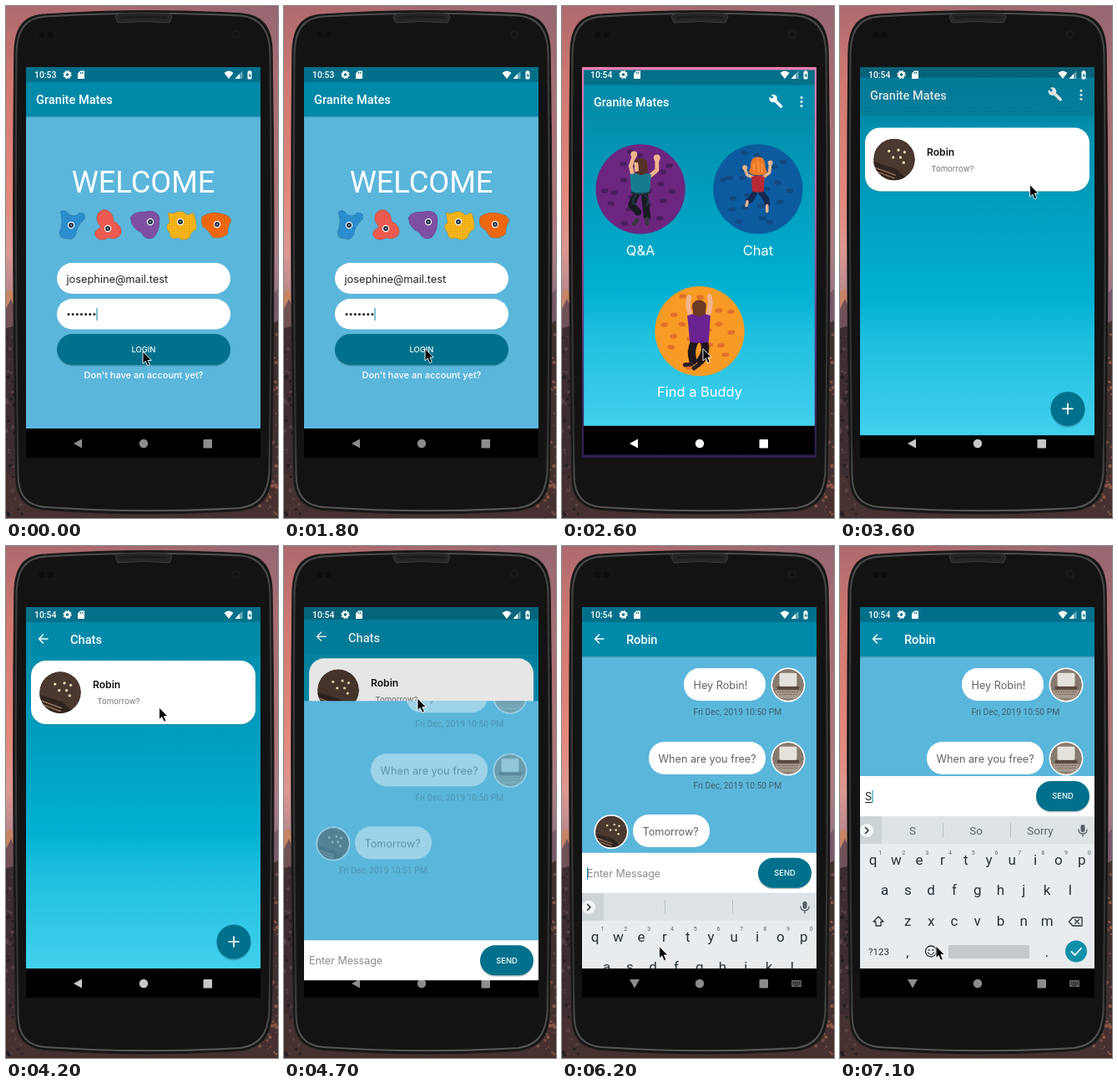
Write an HTML page that moves like this. It is 326 px wide and 612 px high and loops after 7200 ms.

```html
<!DOCTYPE html>
<html lang="en">
<head>
<meta charset="utf-8">
<title>Climbing app walkthrough</title>
<style>
  html, body { margin: 0; width: 100%; height: 100%; overflow: hidden; background: #000; }
  svg { display: block; width: 326px; height: 612px; }
  text { font-family: Inter, sans-serif; white-space: pre; }
  .rb { font-family: Roboto, sans-serif; }
</style>
</head>
<body>
<svg id="stage" viewBox="0 0 326 612" xmlns="http://www.w3.org/2000/svg"></svg>
<script>
const LOOP = 7200;
const APP = 'Granite Mates', FRIEND = 'Robin', EMAIL = 'josephine@mail.test';
const BAR = '#0089a9', STATUS = '#00708a', BUTTON = '#00718c', SKY = '#5bb6db', SKIN = '#f0b48c';

// ---- markup helpers ----
const rect = (x, y, w, h, fill, r = 0, more = '') =>
  `<rect x="${x}" y="${y}" width="${w}" height="${h}" rx="${r}" fill="${fill}" ${more}/>`;
const circ = (x, y, r, fill, more = '') => `<circle cx="${x}" cy="${y}" r="${r}" fill="${fill}" ${more}/>`;
const path = (d, fill, more = '') => `<path d="${d}" fill="${fill}" ${more}/>`;
const line = (d, color, w, more = '') =>
  path(d, 'none', `stroke="${color}" stroke-width="${w}" stroke-linecap="round" stroke-linejoin="round" ${more}`);
const group = (id, body, more = '') => `<g id="${id}" ${more}>${body}</g>`;
const at = (x, y, body) => `<g transform="translate(${x} ${y})">${body}</g>`;
// y is the middle of the capitals
const text = (x, y, size, str, fill = '#fff', more = '') =>
  `<text x="${x}" y="${y + size * .36}" font-size="${size}" fill="${fill}" ${more}>${str.replace('&', '&amp;')}</text>`;
const mid = 'text-anchor="middle"', roboto = 'class="rb"', medium = 'class="rb" font-weight="500"';
const grad = (id, stops, dir = 'x2="0" y2="1"') => `<linearGradient id="${id}" ${dir}>` +
  stops.map(([o, c]) => `<stop offset="${o}" stop-color="${c}"/>`).join('') + '</linearGradient>';
const clip = (id, y) => `<clipPath id="${id}">${rect(24, y, 281, 467, '#000', 0, `id="${id}Box"`)}</clipPath>`;

function random(seed) {
  return () => (seed = (seed * 16807) % 2147483647) / 2147483647;
}

// ---- scenery and handset ----
function scenery() {
  const rnd = random(41);
  let out = rect(0, 0, 326, 612, 'url(#dusk)') + rect(0, 0, 326, 612, 'url(#shade)');
  out += path('M0 342L5 337 12 350V390H0Z', '#c78566') + path('M0 362L6 350 14 370V400H0Z', '#715158');
  out += path('M326 338L320 345 312 355V400H326Z', '#785b6b');
  out += path('M0 385L20 380V612H0Z', '#3d2c30') + path('M310 385L326 376V612H310Z', '#40302f');
  out += rect(0, 560, 326, 52, '#463030');
  for (let i = 0; i < 170; i++) {
    const left = i % 2, x = left ? rnd() * 26 : 300 + rnd() * 26, y = 390 + rnd() * 222;
    out += circ(x.toFixed(1), y.toFixed(1), (.8 + rnd() * 1.6).toFixed(1),
      ['#7a5047', '#261f25', '#8c5845', '#5a4246'][i % 4]);
  }
  return out;
}

function handset() {
  const shell = 'M10 58C10 24 22 11 48 10Q164 2 282 9C307 11 319 24 319 57Q323 300 318 560C317 588 305 599 282 603Q163 611 45 602C23 599 12 588 12 562Q7 300 10 58Z';
  return path(shell, '#131313', 'stroke="#1b1b1b" stroke-width="1.5"') +
    line('M12.500 60C12.500 27 24 13.500 49 12.500Q164 5.500 281 11.500C304 13.500 316.500 28 316.500 58Q319.500 300 315.500 558C313.500 585 302 597 281 600Q163 607 47 599C25 597 14.500 585 14.500 560Q10.500 300 12.500 60Z', 'url(#rim)', 2.2) +
    path('M131 13Q132 9 137 9Q165 7 193 9Q198 9 199 13L196 20Q165 17 134 20Z', '#262626', 'stroke="#3c3c3c"') +
    line('M138 14Q165 12 192 14', '#1c1c1c', 3) +
    circ(276, 34, 5.5, '#1a1a1a') + circ(276, 34, 2.5, '#111') +
    circ(43, 34, 3.5, '#0c0c0c') + circ(53, 34, 3.5, '#0c0c0c');
}

// ---- shared screen parts ----
const navBack = rect(24, 505, 281, 35, '#000');
const title = (x, str) => text(x, 112, 14.6, str, '#fff', medium);
const arrowBack = line('M50 111H39.500M44.500 106L39.500 111L44.500 116', '#fff', 1.5);
const toolbar = body => rect(24, 73, 281, 59, BAR) + rect(24, 73, 281, 18, STATUS) +
  rect(24, 132, 281, 1.5, '#000', 0, 'opacity=".12"') + body;
const pill = (x, y, w, h, label) =>
  rect(x, y + 1.5, w, h, '#000', h / 2, 'opacity=".22"') + rect(x, y, w, h, BUTTON, h / 2) +
  text(x + w / 2, y + h / 2, 9.4, label, '#fff', mid + ' font-weight="500"');
const gradientPage = rect(24, 73, 281, 432, 'url(#sea)') + rect(24, 73, 281, 18, '#04687f', 0, 'opacity=".75"');

function avatar(x, y, r, friend) {
  const art = friend
    ? circ(0, 0, 20, '#4b382f') + path('M-20 2L2 9L14 20H-20Z', '#30241f') +
      line('M-18 8L1 15M-16 12L0 18', '#97705a', 1.2) +
      [[-5, -8], [4, -9], [-1, -2], [6, -2], [10, -7], [9, 3]].map(p => circ(...p, 1.3, '#f7dfb4')).join('')
    : circ(0, 0, 20, '#877a6e') + rect(-11, -15, 22, 17, '#e4e2da', 2) + rect(-14, 2, 28, 4, '#57483f') +
      path('M-17 7H17L12 17H-12Z', '#a69a8c') + line('M-13 9H13M-11 12H11', '#685c54', 1, 'stroke-dasharray="1 2"');
  return `<g transform="translate(${x} ${y}) scale(${r / 20})" clip-path="url(#disc)">${art}</g>`;
}

// ---- login ----
function hold(x, y, color, d, hx, hy) {
  return at(x, y, path(d, color, 'stroke="#000" stroke-opacity=".12"') + path(d, 'url(#dots)') +
    circ(hx, hy, 4.2, '#fff') + circ(hx, hy, 3, '#263244') + circ(hx, hy, 1, '#8ea0b0'));
}

function login() {
  const holds = [
    [78, 262, '#2b90d2', 'M-13-16Q-8-20-2-13Q4-9 10-15Q19-15 16-7Q6 2 6 11Q2 19-5 16Q-14 17-14 8Q-9-2-13-16Z', 0, 0],
    [123, 262, '#f25c50', 'M-13-14Q-7-21 0-17Q6-13 6-5Q17 1 15 10Q10 19 0 15Q-10 21-16 13Q-19 7-9 2Q-17-5-13-14Z', -1, 4],
    [166, 261, '#8050a5', 'M-17-8Q-13-16 0-15Q15-19 18-8Q19 8 11 16Q1 20-4 10Q-16 5-17-8Z', 7, -3],
    [210, 262, '#f8b617', 'M-16-15Q-9-13-5-16Q3-18 7-12L14-15Q19-8 18 5Q12 7 10 15Q3 20-4 15Q-13 19-14 9Q-21 1-14-3Z', -1, -4],
    [252, 262, '#f4690f', 'M-17-10Q-8-17 6-14Q17-12 18-5Q13 2 14 10Q5 18-5 14Q-9 6-16 2Q-19-4-17-10Z', 1, -1]
  ];
  let dots = '';
  for (let i = 0; i < 7; i++) dots += circ(75 + i * 5.15, 368.5, 1.5, '#222');
  return rect(24, 73, 281, 432, SKY) + toolbar(title(36, APP)) +
    text(164.5, 209.5, 36.2, 'WELCOME', '#fff', mid + ' class="rb"') +
    holds.map(h => hold(...h)).join('') +
    rect(61, 307, 208, 37, '#fff', 18.5) + text(72.5, 326, 12.8, EMAIL, '#222') +
    rect(61, 350, 208, 36.5, '#fff', 18.5) + dots + rect(108.500, 361, 1, 15, '#00829f', 0, 'id="pwCaret"') +
    pill(61, 392, 208, 37, 'LOGIN') +
    text(165, 441, 11, "Don't have an account yet?", '#fff', mid + ' font-weight="500"') + navBack;
}

// ---- home ----
function wall(x, y, color, rock, climber, label, seed) {
  const rnd = random(seed);
  let rocks = '';
  for (let i = 0; i < 21; i++) {
    const a = i * 2.4 + rnd() * .4, r = 10.3 * Math.sqrt(i + 1);
    rocks += `<ellipse cx="${(Math.cos(a) * r).toFixed(1)}" cy="${(Math.sin(a) * r).toFixed(1)}" rx="4.500" ry="2.700" fill="${rock}" transform="rotate(${(rnd() * 20 - 10).toFixed(0)})"/>`;
  }
  return at(x, y, circ(0, 0, 54.5, color) + rocks + climber) + text(x, y + 74, 16.7, label, '#fff', mid);
}

const climberA = line('M-9-15L-12-28L-8-40M9-14L20-23L20-36', SKIN, 5) + circ(-8, -42, 4, SKIN) + circ(20, -38, 4, SKIN) +
  line('M-5 6L-11 19L-3 28M5 6L8 33', '#191b23', 8.5) + line('M-4 38L-8 42M8 36L8 42', '#393542', 5) +
  path('M-13-18Q0-21 13-18L11 4Q0 7-11 4Z', '#177b8e') + line('M-11 4Q0 8 11 4M-6 8Q-12 15-7 19M6 8Q12 14 8 19', '#1e3642', 2.500) +
  path('M-8-34Q0-42 8-34L9-21Q0-14-6-20Z', '#563129') + path('M-8-33L-3-32L-2-22L-7-21Z', SKIN);
const climberB = line('M-5-14L-13-17L-16-25M6-14L14-20L15-31', SKIN, 3.6) + circ(-16, -26, 3, SKIN) + circ(15, -32, 3, SKIN) +
  line('M-4 4L-9 13L-12 14M4 4L10 12L11 18', '#142a52', 7) + line('M-13 15L-14 20M11 20L11 27', SKIN, 3.500) +
  path('M-8-15Q0-18 8-15L7 3Q0 5-7 3Z', '#b82936') +
  path('M-9-28Q-9-40 0-39Q9-40 9-27L11-20Q6-16 1-17Q-5-16-11-20Z', '#ed7928') +
  line('M-5-31L-5-21M0-34L1-21M5-31L5-21', '#ffa24a', 1.3);
const climberC = line('M-10-17Q-16-30-13-41M9-17Q15-30 12-42', SKIN, 6) +
  line('M-6 12Q-12 24-8 36M5 12Q10 24 1 36', '#20171d', 9.5) + line('M-10 40L-18 41M0 40L-7 45', '#292024', 5) +
  path('M-15-19Q0-24 13-19L11 13Q-1 16-12 13Z', '#6a2290') + path('M-9-33Q-1-43 8-33L7-21Q-1-15-8-21Z', '#6a3920');

const home = () => gradientPage + rect(24, 91, 281, 41, BAR, 0, 'opacity=".35"') +
  rect(24, 131, 281, 1.5, '#000', 0, 'opacity=".07"') + title(36, APP) +
  at(258, 111, line('M-2-2L6 6', '#fff', 3.6) + circ(-3.5, -3.5, 4.8, '#fff') + path('M-9-7L-7-9L-3-5L-5-3Z', BAR)) +
  [106.5, 111.5, 116.5].map(y => circ(289, y, 1.5, '#fff')).join('') +
  wall(93, 217.500, '#6c2680', '#4a1d60', climberA, 'Q&A', 7) +
  wall(236, 217.500, '#0d5b9f', '#104a80', climberB, 'Chat', 19) +
  wall(165, 390, '#f89b25', '#e0702a', climberC, 'Find a Buddy', 31) + navBack;

// ---- chat list ----
const list = () => gradientPage + rect(24, 91, 281, 41, BAR) + arrowBack + title(77, 'Chats') +
  rect(30, 138, 269, 76, '#000', 18, 'opacity=".13"') + rect(30, 137, 269, 76, '#fff', 18) +
  avatar(65, 175, 25, true) + text(104, 166, 12.1, FRIEND, '#111', 'font-weight="600"') +
  text(109.5, 186, 9.6, 'Tomorrow?', '#777') +
  circ(273, 475, 20.5, '#000', 'opacity=".18"') + circ(273, 473, 20.5, BUTTON) +
  line('M267 473H279M273 467V479', '#fff', 1.7) + navBack;

// ---- conversation ----
const bubble = (x, y, w, str) => rect(x, y, w, 39, '#fff', 19) + text(x + 11.5, y + 20, 12.7, str, '#626262');
const face = (x, y, friend) => circ(x, y, 20.5, '#fff') + avatar(x, y, 19, friend);
const stamp = (x, y, time) => text(x, y, 10.3, `Fri Dec, 2019 ${time} PM`, '#3c626f', roboto);

function keyboard() {
  const ink = '#263238';
  const key = (x, y, c, size = 17) => text(x, y, size, c, ink, mid + ' ' + roboto);
  let out = rect(24, 323, 281, 182, '#e8ecef') + rect(24, 323, 281, 33, '#dee3e6') + rect(24, 323, 26, 33, '#cdd4d8') +
    circ(32, 340, 8, '#f4f6f7') + line('M30.500 336.500L34 340L30.500 343.500', ink, 1.6) +
    rect(123, 331, 1, 17, '#b9c1c5') + rect(204, 331, 1, 17, '#b9c1c5') +
    rect(288.500, 333, 5, 9, '#546067', 2.5) + line('M286 339Q286 344 291 344Q296 344 296 339M291 344V347', '#546067', 1.3) +
    group('hints', ['S', 'So', 'Sorry'].map((w, i) => text([87, 163, 240][i], 340, 13.5, w, '#56646b', mid + ' ' + roboto)).join(''));
  [...'qwertyuiop'].forEach((c, i) => {
    const x = 39.5 + i * 27.8;
    out += key(x, 375, c) + text(x + 9, 366, 7, String((i + 1) % 10), '#56646b', mid + ' ' + roboto);
  });
  [...'asdfghjkl'].forEach((c, i) => out += key(53.5 + i * 27.8, 411, c));
  [...'zxcvbnm'].forEach((c, i) => out += key(81.3 + i * 27.8, 448, c));
  return out + line('M46 443L52 449H49V454H43V449H40Z', ink, 1.3) +
    line('M279 444H290V454H279L274.500 449ZM281.500 446.500L286.500 451.500M286.500 446.500L281.500 451.500', ink, 1.3) +
    key(46.5, 485, '?123', 11.5) + key(81, 485, ',') + key(248, 485, '.') +
    circ(109, 484.5, 6.5, 'none', `stroke="${ink}" stroke-width="1.3"`) + circ(106.7, 483, 1, ink) + circ(111.300, 483, 1, ink) +
    line('M105.500 486Q109 491 112.500 486', ink, 1.2) +
    rect(130, 477, 97, 16, '#c3c9cc', 1.5) +
    circ(283, 484.5, 13, '#118fa9') + line('M277.500 485L281.500 489L289 481', '#fff', 1.8);
}

const chat = () => rect(24, 73, 281, 432, SKY) + toolbar(arrowBack + title(77, FRIEND)) +
  group('messages',
    bubble(146, 146, 98, `Hey ${FRIEND}!`) + face(271, 166) + stamp(157.5, 198, '10:50') +
    bubble(104, 234, 140, 'When are you free?') + face(271, 254) + stamp(157.5, 286, '10:50') +
    bubble(85, 321, 92, 'Tomorrow?') + face(59, 341.5, true) + stamp(66, 373, '10:51')) +
  group('keys', keyboard()) +
  group('entry', rect(24, 457, 281, 48, '#fff') +
    text(30, 481.5, 12.5, 'Enter Message', '#8b8b8b', 'id="hint"') +
    group('typed', text(30, 481.5, 12.7, 'S', '#222') + rect(30, 488, 8, 1, '#222')) +
    rect(30, 474, 1, 15, '#0089a9', 0, 'id="caret"') + pill(235, 463, 64, 36, 'SEND')) + navBack;

// ---- system icons and pointer ----
const statusIcons = () => text(34, 82.5, 10.4, '10:53', '#fff', medium + ' id="clock"') +
  circ(73.5, 82, 2.9, 'none', 'stroke="#fff" stroke-width="2.2"') +
  circ(73.5, 82, 4.4, 'none', 'stroke="#fff" stroke-width="1.5" stroke-dasharray="1.900 1.556"') +
  path('M89 77.500H94V87H86V80.500Z', '#fff') + rect(89, 79, 1, 2, STATUS) + rect(91, 79, 1, 2, STATUS) +
  path('M261.500 80Q267 75 272.500 80L267 87Z', '#fff') +
  path('M283.500 77.500V87H274.500Z', '#fff', 'opacity=".4"') + path('M280 81V87H274.500Z', '#fff') +
  rect(289.500, 78, 5, 9.5, '#fff', 1) + rect(291, 77, 2, 2, '#fff') + path('M292.500 80L290.500 83.500H292V86L294 82.500H292.500Z', STATUS);

const navIcons = () => path('M81 523L91 517.500V528.500Z', '#fff', 'id="back"') + circ(165, 523, 5.2, '#fff') +
  rect(236.5, 518, 10.500, 10.500, '#fff', 1) +
  group('imeIcon', rect(275, 519, 12, 8, '#fff', 1, 'opacity=".7"') + line('M277 521.500H286M277 523.500H286M279 525.500H283', '#000', 1, 'stroke-dasharray="1 1.500"'));

const stage = document.getElementById('stage');
stage.innerHTML = '<defs>' +
  grad('dusk', [[0, '#ad6a6e'], [.14, '#cf7771'], [.36, '#e48779'], [.48, '#dc9791'], [.56, '#b9898f'], [1, '#4c3438']]) +
  '<linearGradient id="shade"><stop offset=".3" stop-color="#7d6478" stop-opacity="0"/><stop offset="1" stop-color="#7d6478" stop-opacity=".5"/></linearGradient>' +
  grad('sea', [[0, '#0488a7'], [.15, '#038fae'], [.62, '#00b0d2'], [.74, '#1fbfde'], [1, '#42d0ee']]) +
  grad('rim', [[0, '#4c4c4c'], [.12, '#3a3a3a'], [.85, '#323232'], [1, '#585858']]) +
  grad('backdrop', [[0, '#e77db1'], [.3, '#b46aa6'], [.7, '#54357a'], [1, '#2c1d4c']]) +
  '<pattern id="dots" width="3" height="3" patternUnits="userSpaceOnUse"><circle cx="1" cy="1" r=".6" fill="#333" opacity=".32"/></pattern>' +
  '<clipPath id="disc"><circle r="20"/></clipPath>' +
  clip('screen', 73) + clip('listClip', 73) + clip('chatClip', 73) + '</defs>' +
  scenery() + handset() +
  group('display', rect(24, 73, 281, 467, 'url(#backdrop)') + group('login', login()) +
    group('home', home() + rect(24, 73, 281, 467, '#000', 0, 'id="homeDim"')) +
    group('listWin', group('list', list() + rect(24, 73, 281, 467, '#000', 0, 'id="listDim"')), 'clip-path="url(#listClip)"') +
    group('chatWin', group('chat', chat()), 'clip-path="url(#chatClip)"') +
    statusIcons() + group('nav', navIcons()), 'clip-path="url(#screen)"') +
  group('pointer', path('M0 0V14.500L3.300 11.500L5.700 17.200L8.300 16L5.900 10.500H10.300Z', '#000', 'stroke="#fff" stroke-width=".9"'));

// ---- motion ----
const el = {};
stage.querySelectorAll('[id]').forEach(n => el[n.id] = n);
const set = (id, name, value) => el[id].setAttribute(name, value);
const show = (id, on) => set(id, 'visibility', on ? 'inherit' : 'hidden');
const shift = (id, x, y) => set(id, 'transform', `translate(${x} ${y})`);
const ramp = (t, start, length) => Math.min(1, Math.max(0, (t - start) / length));
const easeOut = u => 1 - (1 - u) ** 3;
const easeBoth = u => u * u * (3 - 2 * u);

const TRACK = [[0, 164, 413], [600, 164, 413], [1500, 169, 409.5], [2800, 169, 409.5], [3350, 227.5, 213.5],
  [3900, 227.5, 213.5], [4400, 160, 182], [4900, 160, 182], [5500, 118, 479], [6000, 118, 479], [6400, 115, 478]];

function pointerAt(t) {
  let i = 0;
  while (i < TRACK.length - 1 && TRACK[i + 1][0] <= t) i++;
  const a = TRACK[i], b = TRACK[i + 1] || a;
  const u = easeBoth(ramp(t, a[0], b[0] - a[0] || 1));
  return [a[1] + (b[1] - a[1]) * u, a[2] + (b[2] - a[2]) * u];
}

// A window rises while its clip opens; the one below lifts and dims.
function openOver(t, start, over, under) {
  const p = easeOut(ramp(t, start, 400));
  show(over + 'Win', t >= start);
  shift(over, 0, 46 * (1 - p));
  set(over + 'ClipBox', 'y', 540 - 467 * (1 - (1 - p) ** 1.22));
  set(under + 'Dim', 'opacity', .14 * p);
  return -12 * p ** 4;
}

function render(t) {
  show('login', t < 2560);
  show('pwCaret', (t + 300) % 1000 < 500);
  el.clock.textContent = t < 2500 ? '10:53' : '10:54';

  const grow = ramp(t, 2480, 250), scale = 1 - .03 * (1 - grow);
  const lift = openOver(t, 3428, 'list', 'home');
  show('home', t >= 2480 && t < 3900);
  set('home', 'opacity', Math.min(1, grow * 2.2));
  set('home', 'transform', `translate(164.5 ${306 + lift}) scale(${scale}) translate(-164.5 -306)`);

  const listLift = openOver(t, 4572, 'chat', 'list');
  if (t >= 4572) shift('list', 0, listLift);
  set('messages', 'opacity', ramp(t, 4640, 150));

  const k = easeOut(ramp(t, 6150, 250)), typed = t >= 6900;
  shift('keys', 0, 182 * (1 - k));
  show('keys', k > 0);
  shift('entry', 0, -182 * k);
  show('hint', !typed);
  show('typed', typed);
  show('hints', typed);
  set('caret', 'x', typed ? 38.5 : 30);
  show('caret', t > 6050 && (typed || (t - 6050) % 1000 < 500));
  set('back', 'd', t > 6150 ? 'M81 518H93L87 528.500Z' : 'M81 523L91 517.500V528.500Z');
  show('imeIcon', t > 6150);
  set('nav', 'opacity', t < 2500 ? .55 : t < 3450 ? 1 : t < 4600 ? .78 : .55);

  shift('pointer', ...pointerAt(t));
}

const begin = performance.now();
function tick() {
  render((performance.now() - begin) % LOOP);
  requestAnimationFrame(tick);
}
render(0);
tick();
</script>
</body>
</html>
```
